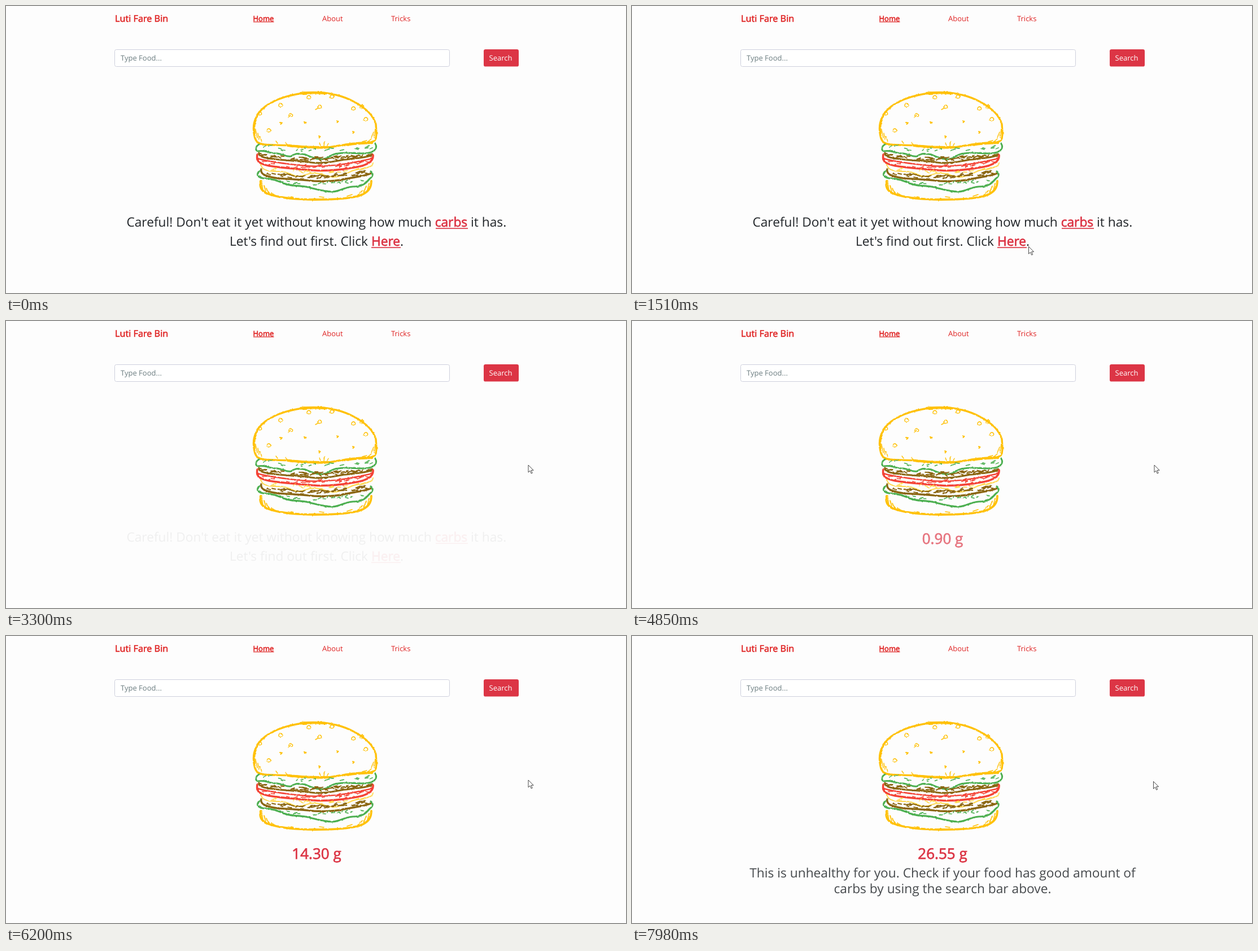
Write an HTML page that moves like this. It is 1098 px wide and 510 px high and loops after 8 s.

```html
<!DOCTYPE html>
<html lang="en">
<head>
<meta charset="utf-8">
<title>Carb counter</title>
<style>
  html, body { margin: 0; width: 100%; height: 100%; overflow: hidden; background: #fdfdfd; }
  svg { display: block; width: 1098px; height: 510px; font-family: "Open Sans", "Noto Sans", sans-serif; }
  text { white-space: pre; text-rendering: geometricPrecision; }
  .nav { font-size: 13px; fill: #df2424; }
  .big { font-size: 22.72px; fill: #212529; text-anchor: middle; }
  .link { fill: #dc3545; stroke: #dc3545; stroke-width: .75; }
  .rule { fill: #dc3545; }
  .sketch { fill: none; stroke-linecap: round; stroke-linejoin: round; }
</style>
</head>
<body>
<svg viewBox="0 0 1098 510">
  <defs>
    <filter id="rough" filterUnits="userSpaceOnUse" x="425" y="140" width="245" height="215" color-interpolation-filters="sRGB">
      <feTurbulence type="fractalNoise" baseFrequency=".2" numOctaves="2" seed="4"/>
      <feDisplacementMap in="SourceGraphic" scale="2.6" xChannelSelector="R" yChannelSelector="G"/>
    </filter>
  </defs>

  <text x="193" y="27.5" font-size="16.27" fill="#df2020" stroke="#df2020" stroke-width=".5">Luti Fare Bin</text>
  <g class="nav">
    <text x="437.5" y="26.5" stroke="#df2020" stroke-width=".6">Home</text>
    <rect x="438" y="27.7" width="36.5" height="1.2"/>
    <text x="560" y="26.5">About</text>
    <text x="682" y="26.5">Tricks</text>
  </g>
  <rect x="192.5" y="77.5" width="593" height="30" rx="3" fill="#fff" stroke="#ced0dd"/>
  <text x="203" y="97" font-size="13" fill="#6c7d80">Type Food...</text>
  <rect x="846" y="77" width="62" height="30.6" rx="3.2" fill="#dc3545"/>
  <text x="855.6" y="97" font-size="13" fill="#fff">Search</text>

  <g id="burger" class="sketch" filter="url(#rough)"></g>

  <g id="intro">
    <text class="big" x="549.8" y="392.2">Careful! Don't eat it yet without knowing how much <tspan class="link">carbs</tspan> it has.</text>
    <rect class="rule" x="761" y="394.4" width="57" height="1.7"/>
    <text class="big" x="550" y="426.3">Let's find out first. Click <tspan class="link">Here</tspan>.</text>
    <rect class="rule" x="647" y="428.4" width="52" height="1.7"/>
  </g>
  <text id="counter" x="550" y="395.5" font-size="26.03" text-anchor="middle" fill="#dc3545" stroke="#dc3545" stroke-width=".75"></text>
  <g id="verdict">
    <text class="big" x="550" y="429.4">This is unhealthy for you. Check if your food has good amount of</text>
    <text class="big" x="550" y="456.7">carbs by using the search bar above.</text>
  </g>

  <circle id="ring" cx="684" cy="420" r="9.8" fill="#ff0" fill-opacity=".47"/>
  <g id="cursor" fill="#fff" stroke="#222" stroke-width="1" stroke-linejoin="round">
    <path id="arrow" transform="scale(.8133)" d="M.6 .6V16.5L4.3 13L7 19L9.4 18L6.8 12H11.8Z"/>
    <path id="hand" transform="scale(.8133)" d="M-1.5 1.8C-1.5 0 1.6 0 1.6 1.8V7C2 6 4.8 6.2 5 7.8C5.6 6.8 8 7.2 8.2 8.8C9 8 10.8 8.6 10.8 10.2V15C10.8 17 9 18.4 9 21.4H-.6C-.6 19 -3.4 16.6 -5 13.4C-6 11.4 -3.4 10.6 -1.5 13Z"/>
  </g>
</svg>
<script>
const LOOP = 8000;
const el = id => document.getElementById(id);
const burger = el("burger");

function stroke(color, width, d) {
  const path = document.createElementNS("http://www.w3.org/2000/svg", "path");
  path.setAttribute("d", d);
  path.setAttribute("stroke", color);
  path.setAttribute("stroke-width", width);
  burger.append(path);
}

let seed = 11;
const random = () => (seed = seed * 16807 % 2147483647) / 2147483647;

// Short random dashes in a band that sags by `sag` in the middle
function flecks(color, count, x0, x1, y0, y1, sag, length = 5, width = 1.4) {
  let d = "";
  for (let i = 0; i < count; i++) {
    const u = random();
    const x = x0 + (x1 - x0) * u;
    const y = y0 + (y1 - y0) * random() + sag * 4 * u * (1 - u);
    d += `M${x} ${y}l${length * (.4 + random())} ${(random() - .6) * length}`;
  }
  stroke(color, width, d);
}

function drawBurger() {
  const bun = "#ffc107", leaf = "#4caf50", meat = "#8a6510", tomato = "#f44336", cheese = "#ffd84f";

  stroke(bun, 3.4, "M445 242C438 234 436 213 444 196C456 172 498 154 548 154C598 153 646 180 655 210C656 224 657 234 653 239C645 246 615 243 590 248C560 255 530 250 500 248C480 246 455 249 445 242");
  stroke(bun, 4.4, "M442 201C439 209 438 217 440 226M522 155Q545 153 566 155M500 248Q535 252 570 251M600 247Q625 243 648 243");
  const rings = [[486, 176], [504, 194], [536, 162], [555, 179], [577, 161], [615, 182], [630, 179], [465, 221], [449, 191], [637, 201]];
  for (const [x, y] of rings) stroke(bun, 1.5, `M${x - 3} ${y + 1}q0 -4 4 -4q4 2 2 5q-3 2 -6 0`);
  const dots = [[529, 207], [555, 232], [587, 205], [615, 224], [487, 208]];
  for (const [x, y] of dots) stroke(bun, 2, `M${x - 1} ${y - 1}l2.5 1l-2 2`);
  stroke(bun, 1.4, "M548 184l6 -3M500 198l4 -4M442 220l3 14M446 226l2 11M450 232l3 9M651 224l-4 10M654 218l-2 16M647 236l-6 5M495 243l4 4M555 243l2 5M564 241l-1 8M571 244l-2 4M631 241l8 -2M478 240l3 4");

  stroke(leaf, 3, "M448 246C441 250 441 257 447 258C458 255 466 262 480 262C492 263 496 269 505 267C512 261 520 262 530 264C540 268 550 273 562 272C574 270 574 263 588 262C608 259 626 264 642 261C654 259 658 251 654 245");
  flecks(leaf, 20, 456, 645, 248, 255, 4, 5, 1.6);

  flecks(meat, 58, 449, 642, 262, 268, 6, 6, 2);
  stroke(meat, 3.2, "M448 261C447 267 456 270 475 272C500 275 520 275 540 278C560 281 580 276 600 273C620 270 640 270 649 264");

  stroke(tomato, 3.6, "M445 264C443 276 447 280 466 284C490 288 520 290 545 292C570 294 600 290 622 286C642 282 651 275 650 265");
  stroke(tomato, 2.4, "M446 271C465 277 500 281 530 284C570 287 605 281 649 271");
  flecks(tomato, 26, 452, 640, 275, 280, 8, 6, 1.5);

  stroke(cheese, 2, "M452 282C452 291 464 294 480 294C498 293 505 301 517 303C529 303 532 296 548 297C564 298 568 304 580 304C598 303 606 294 620 291C635 288 648 288 650 279");
  flecks(cheese, 18, 458, 638, 286, 290, 7, 5, 1.6);

  flecks(meat, 50, 453, 638, 293, 299, 7, 6, 2);
  stroke(meat, 3.4, "M452 290C450 300 462 303 480 306C505 308 520 308 545 311C565 312 580 312 598 308C615 304 635 303 647 297");

  stroke(leaf, 3.2, "M449 293C443 299 445 304 455 306C470 306 482 311 492 315C502 320 516 319 530 321C548 325 562 330 578 330C594 329 598 322 614 321C632 321 637 315 644 307C651 302 650 297 646 294");
  flecks(leaf, 20, 460, 636, 305, 310, 9, 5, 1.6);

  stroke(bun, 3.8, "M451 311C449 320 451 328 462 333C485 342 515 344 548 344C585 344 610 342 626 337C642 331 647 323 647 311");
  stroke(bun, 1.7, "M453 314l2 15M457 318l3 12M461 324l5 9M643 315l-3 13M638 320l-5 12M631 328l-8 8M470 332l7 5M500 338l9 2M604 338l9 -3M555 339l8 1");
}

const clamp = x => Math.min(1, Math.max(0, x));
const swing = p => .5 - Math.cos(Math.PI * clamp(p)) / 2;
const linear = p => p;

// keys: [time, ...values]
function track(keys, t, ease) {
  if (t <= keys[0][0]) return keys[0].slice(1);
  const i = keys.findIndex(k => k[0] > t);
  if (i < 0) return keys[keys.length - 1].slice(1);
  const a = keys[i - 1], b = keys[i];
  const p = ease((t - a[0]) / (b[0] - a[0]));
  return a.slice(1).map((v, j) => v + (b[j + 1] - v) * p);
}

const pointerKeys = [
  [50, 1077, 447], [310, 1047, 311], [740, 1047, 311], [1510, 702, 427], [1550, 697, 427],
  [1570, 697, 430], [1820, 684, 420], [2350, 684, 420], [3130, 924.5, 255.5],
  [7900, 924.5, 255.5], [7980, 923, 258]
];
const carbKeys = [[4770, 0], [4850, .9], [5670, 10], [6200, 14.3], [6910, 23.55], [7150, 26.55]];

const fade = (id, opacity) => el(id).setAttribute("opacity", opacity);
const show = (id, on) => el(id).setAttribute("visibility", on ? "visible" : "hidden");

function render(t) {
  const [x, y] = track(pointerKeys, t, swing);
  const overLink = t >= 1560 && x < 700 && y > 402;
  el("cursor").setAttribute("transform", `translate(${x} ${y})`);
  show("arrow", t >= 50 && !overLink);
  show("hand", overLink);
  show("ring", t >= 2160 && t < 2370);

  fade("intro", 1 - swing((t - 2458) / 1000));
  fade("counter", swing((t - 3924) / 1500));
  fade("verdict", swing((t - 7250) / 1000));

  const [carbs] = track(carbKeys, t, linear);
  el("counter").textContent = (Math.floor(carbs * 20 + 1e-6) / 20).toFixed(2) + " g";
}

drawBurger();
let start;
function tick(now) {
  start ??= now;
  render((now - start) % LOOP);
  requestAnimationFrame(tick);
}
render(0);
requestAnimationFrame(tick);
</script>
</body>
</html>
```
